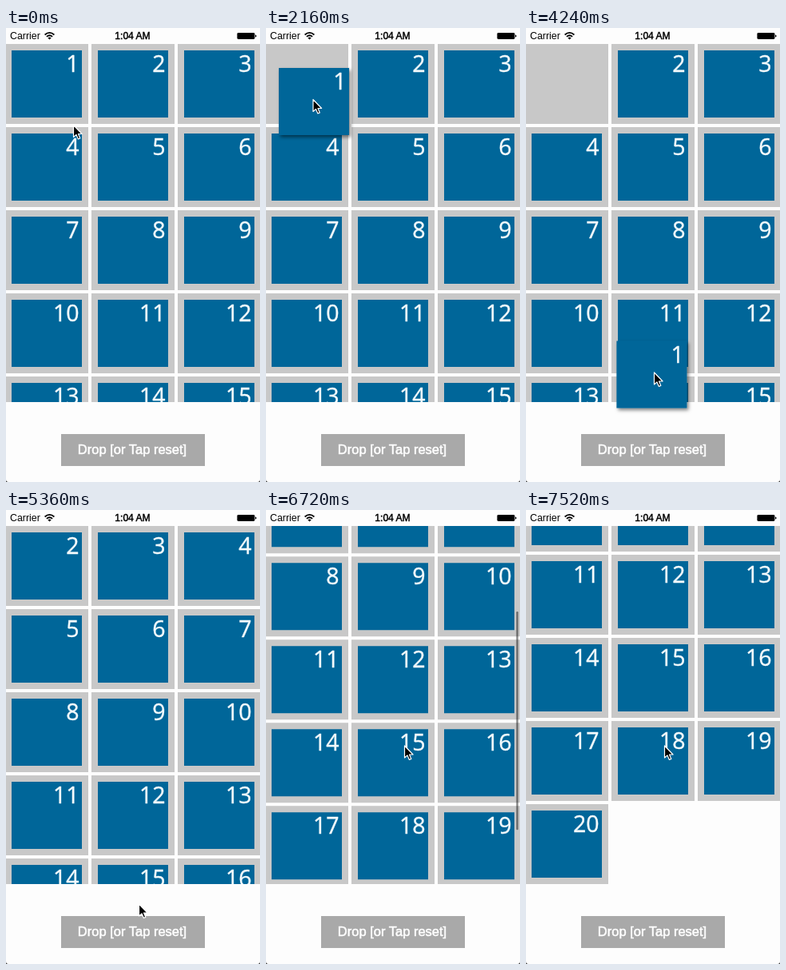
Write an HTML page that moves like this. It is 318x568 px and loops after 8000 ms.

```html
<!DOCTYPE html>
<html lang="en">
<head>
<meta charset="utf-8">
<title>Drag, drop and scroll</title>
<style>
  html, body { margin: 0; width: 100%; height: 100%; overflow: hidden; background: #fdfdfd; }
  svg { display: block; width: 318px; height: 568px; }
  .ui { font-family: "Liberation Sans", Arial, sans-serif; }
  .num {
    font: 500 28.5px "Open Sans", "Noto Sans", sans-serif;
    fill: #f4fafc; stroke: #f4fafc; stroke-width: .4; text-anchor: end;
  }
</style>
</head>
<body>
<svg viewBox="0 0 318 568">
  <defs>
    <clipPath id="view"><rect y="20" width="318" height="448"/></clipPath>
    <filter id="shadow" x="-20%" y="-20%" width="140%" height="145%">
      <feDropShadow dx="2" dy="2.5" stdDeviation="2.2" flood-color="#000" flood-opacity=".5"/>
    </filter>
  </defs>
  <path d="M0 565V568H3Q0 568 0 565ZM318 565V568H315Q318 568 318 565Z" fill="#222"/>

  <g clip-path="url(#view)"><g id="grid"></g></g>
  <rect id="bar" x="313.3" width="2.5" rx="1.25" fill="#000" fill-opacity=".45"/>

  <g class="ui">
    <text x="5" y="14.2" font-size="12.4">Carrier</text>
    <text x="158.5" y="14" font-size="12.1" text-anchor="middle" stroke="#000" stroke-width=".45">1:04 AM</text>
    <g fill="none" stroke="#000" stroke-width="1.8">
      <path d="M48.6 8.5Q54.5 3.3 60.4 8.5"/>
      <path d="M50.9 10.9Q54.5 7.7 58.1 10.9"/>
    </g>
    <path d="M52.4 12.4Q54.5 10.6 56.6 12.4L54.5 14.6Z"/>
    <rect x="289.4" y="6" width="22" height="8" rx="1.4"/>
    <path d="M312 8.4Q313.6 8.7 313.6 10T312 11.6Z"/>
    <rect x="69" y="508" width="180" height="40" fill="#a9a9a9"/>
    <text x="158" y="533" font-size="16.5" text-anchor="middle" fill="#fff" stroke="#fff" stroke-width=".55">Drop [or Tap reset]</text>
  </g>

  <g id="lifted" filter="url(#shadow)"></g>
  <path id="cursor" d="M0 0V15L3.5 11.9L5.9 17.4L8.3 16.4L6 11H10.6Z" fill="#000" stroke="#fff" stroke-width="1.2" stroke-linejoin="round"/>
</svg>
<script>
const LOOP = 8000, STEP = 80;
const LIFT = 2160, DROP = 5360, FLICK = 6469, SETTLED = 7520;
const COUNT = 20, VIEW = 448, MAX_SCROLL = 276;

const clamp = v => Math.min(1, Math.max(0, v));
const ease = p => p * p * (3 - 2 * p);

// Eased moves: start, end, and the point reached
const cursorMoves = [
  [0, 720, 59, 89.5], [3040, 4240, 160.5, 431],
  [4320, 5120, 166.5, 493], [6160, 6720, 173.5, 295]
];
const tileMoves = [[3040, 4240, 113.4, 391.5], [4320, 5120, 119.4, 453.5]];

function follow(x, y, moves, t) {
  for (const [from, to, x2, y2] of moves) {
    const p = ease(clamp((t - from) / (to - from)));
    x += (x2 - x) * p;
    y += (y2 - y) * p;
  }
  return [x, y];
}

// Damped spring: runs past the end of the list, then comes back
function scrollAt(t) {
  if (t <= FLICK) return 0;
  if (t >= SETTLED) return MAX_SCROLL;
  const u = t - FLICK, decay = 0.00455, freq = 0.00491;
  const swing = Math.cos(freq * u) + decay / freq * Math.sin(freq * u);
  return MAX_SCROLL * (1 - Math.exp(-decay * u) * swing);
}

const $ = id => document.getElementById(id);
const grid = $("grid"), bar = $("bar"), lifted = $("lifted"), cursor = $("cursor");
const move = (el, x, y) => el.setAttribute("transform", `translate(${x} ${y})`);

function tile(n) {
  return `<rect width="88" height="84" fill="#006699"/><text class="num" x="84.5" y="27">${n}</text>`;
}

function cell(n, i, empty) {
  const x = -1 + 108 * (i % 3), y = 20 + 104 * Math.floor(i / 3);
  return `<g transform="translate(${x} ${y})"><rect width="104" height="100" fill="#c8c8c8"/>` +
    (empty ? "" : `<g transform="translate(8 8)">${tile(n)}</g>`) + "</g>";
}

let phase;
function fillGrid(next) {
  if (next === phase) return;
  phase = next;
  const first = phase === "dropped" ? 2 : 1;
  let out = "";
  for (let n = first; n <= COUNT; n++) out += cell(n, n - first, n === 1 && phase === "lifted");
  grid.innerHTML = out;
}

function drawBar(scroll, t) {
  const ratio = VIEW / (MAX_SCROLL + VIEW);
  const over = Math.max(0, scroll - MAX_SCROLL);
  bar.setAttribute("y", 22 + (scroll - over) * ratio + over);
  bar.setAttribute("height", VIEW * ratio - 4 - over);
  bar.setAttribute("opacity", t < FLICK ? 0 : clamp((SETTLED - t) / 240));
}

function draw(t) {
  fillGrid(t < LIFT ? "rest" : t < DROP ? "lifted" : "dropped");
  const scroll = scrollAt(t);
  move(cursor, ...follow(84.5, 121.5, cursorMoves, t));
  move(lifted, ...follow(16, 50, tileMoves, t));
  lifted.style.display = phase === "lifted" ? "" : "none";
  move(grid, 0, -scroll);
  drawBar(scroll, t);
}

lifted.innerHTML = tile(1);
const start = performance.now();
function tick() {
  const t = (performance.now() - start) % LOOP;
  draw(Math.floor(t / STEP) * STEP);
  requestAnimationFrame(tick);
}
tick();
</script>
</body>
</html>
```
